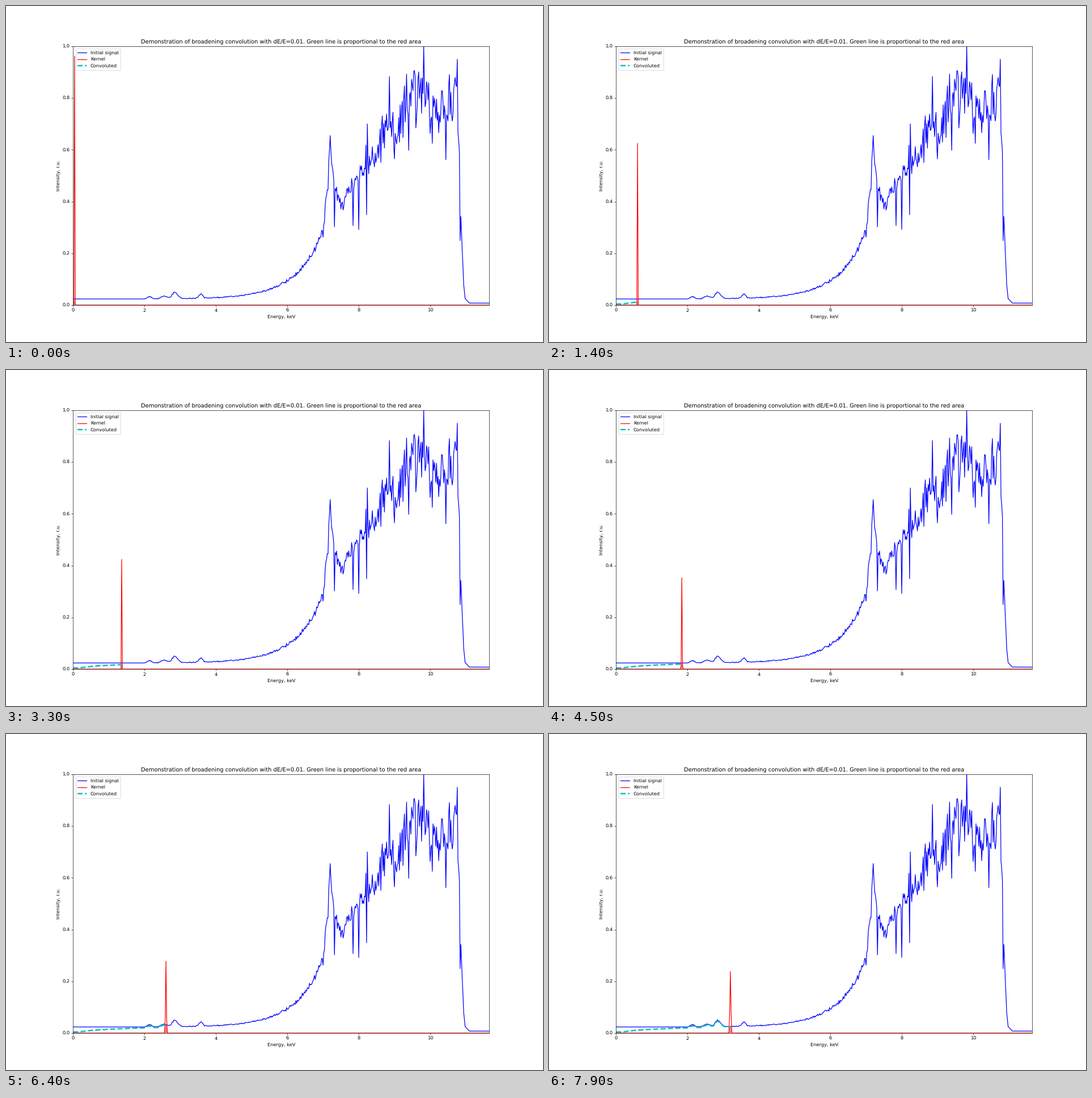
These frames come from a looping animation (947x592 px, 8 s). A matplotlib script:

```python
import numpy as np
import matplotlib.pyplot as plt
from matplotlib.animation import FuncAnimation

FRAMES, INTERVAL = 80, 100
STEP = 0.02
DE_E = 0.01
FWHM = 2 * np.sqrt(2 * np.log(2))

# Key points (energy, intensity): the mean curve above 7 keV, then lone spikes
EDGE = [(7, .27), (7.08, .403), (7.14, .478), (7.2, .663), (7.22, .58),
        (7.3, .513), (7.34, .454), (7.54, .385), (7.7, .458), (8.2, .53),
        (8.6, .61), (8.8, .74), (9.1, .71), (9.4, .76), (9.9, .86),
        (10, .74), (10.4, .72), (10.66, .8), (10.76, .943), (10.78, .675),
        (10.82, .598), (10.84, .25), (10.86, .343), (10.94, .08),
        (10.98, .025), (11.1, .0075)]
SPIKES = [(7.32, .302), (7.84, .307), (8, .292), (8.2, .618), (8.22, .349),
          (8.24, .7), (8.86, .883), (9, .565), (9.34, .893), (9.4, .598),
          (9.54, .903), (9.82, 1), (10.06, .625), (10.44, .562),
          (10.54, .891)]

plt.rcParams["text.hinting"] = "none"
energy = np.arange(584) * STEP


def gauss(x, center, sigma):
    return np.exp(-((x - center) / sigma) ** 2 / 2)


def make_signal():
    """Exponential foot, absorption edge and a noisy plateau."""
    foot = 0.0235 + 0.2 * np.exp(1.3 * (energy - 6.8))
    foot += 0.009 * gauss(energy, 2.14, 0.05) + 0.009 * gauss(energy, 2.55, 0.08)
    foot += 0.024 * gauss(energy, 2.85, 0.08) + 0.016 * gauss(energy, 3.58, 0.05)
    mean = np.where(energy < 7, foot, np.interp(energy, *np.transpose(EDGE)))

    rng = np.random.default_rng(4)
    noise = np.clip(rng.standard_normal(energy.size), -1.7, 1.7)
    rough = np.interp(energy, [8.2, 8.8], [0.04, 0.085])
    rough[energy > 10.75] = 0.01
    y = np.minimum(mean * (1 + rough * noise), 0.95)
    y[energy < 2] = 0.0235
    for e, v in SPIKES:
        y[round(e / STEP)] = v
    return y


def kernel(center):
    sigma = DE_E * max(center, 0.17) / FWHM
    return gauss(energy, center, sigma) / (1 + center)


def convolve(center):
    k = kernel(center)
    e = max(center, 0.17)
    gain = np.sqrt(np.pi / 2) * e / (1 + e)
    return gain * (k @ signal) / k.sum()


signal = make_signal()
conv = np.array([convolve(e) for e in energy])

fig, ax = plt.subplots(figsize=(16, 10), dpi=59.2)
ax.plot(energy, signal, "b", label="Initial signal")
kernel_line, = ax.plot([], [], "r", label="Kernel")
conv_line, = ax.plot([], [], "c--", lw=3, label="Convoluted")
area, = ax.fill([0, 0, 0], [0, 0, 0], color="r", alpha=0.5, lw=0)

ax.set_xlim(0, energy[-1])
ax.set_ylim(0, 1)
ax.set_xlabel("Energy, keV")
ax.set_ylabel("Intensity, r.u.")
ax.set_title("Demonstration of broadening convolution with dE/E=0.01. "
             "Green line is proportional to the red area")
ax.legend(loc="upper left")


def update(i):
    n = 2 * (i + 1)
    k = kernel(energy[n])
    kernel_line.set_data(energy, k)
    conv_line.set_data(energy[:n + 1], conv[:n + 1])
    top = np.column_stack([energy, np.minimum(k, signal)])
    area.set_xy(np.vstack([[0, 0], top, [energy[-1], 0]]))
    return kernel_line, conv_line, area


anim = FuncAnimation(fig, update, frames=FRAMES, interval=INTERVAL,
                     repeat=True, repeat_delay=0)
plt.show()
```
